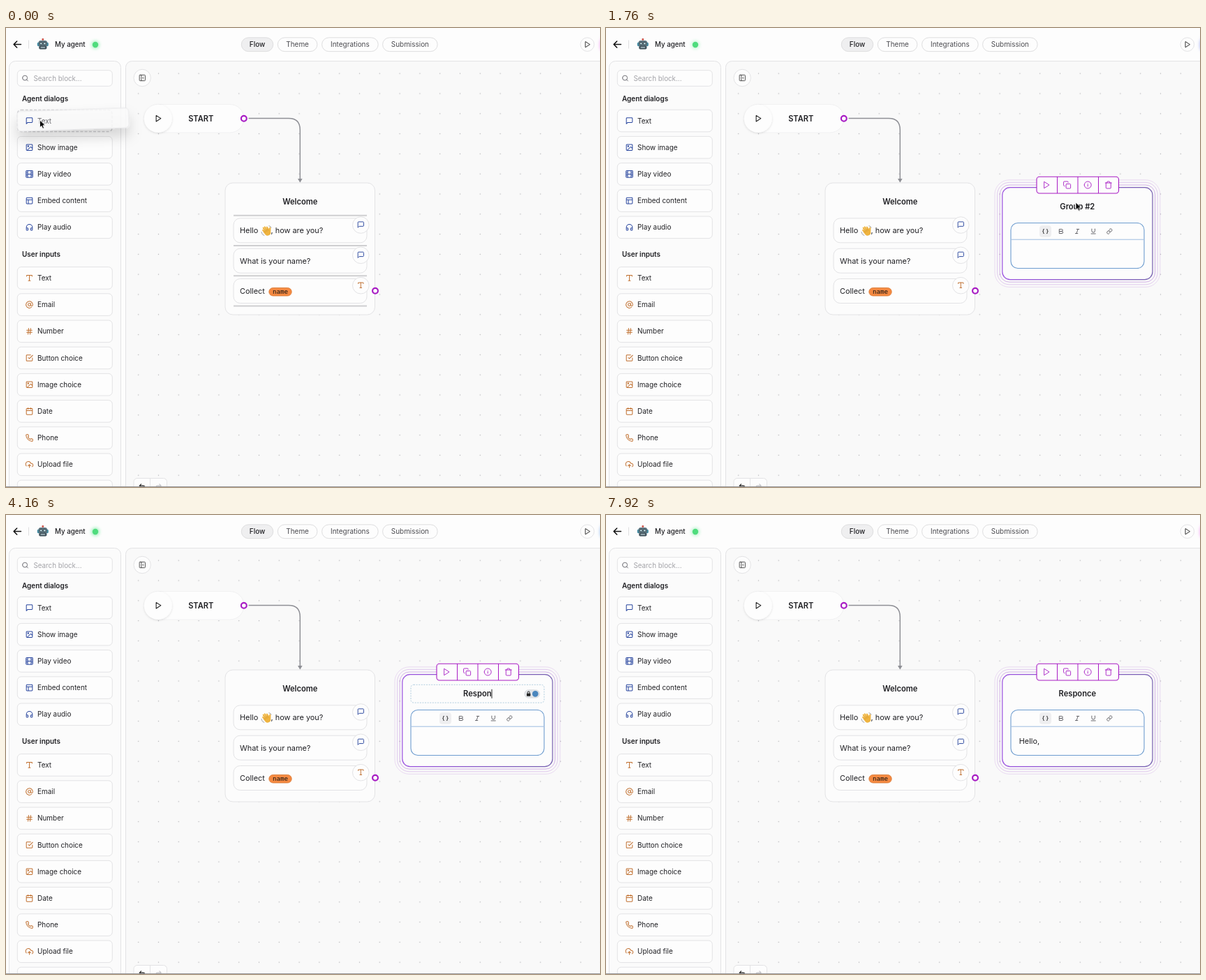
Recreate the animation shown at these times as an HTML page. Size 851 by 658 pixels, loop 8000 ms.

```html
<!DOCTYPE html>
<html lang="en">
<head>
<meta charset="utf-8">
<title>Flow editor</title>
<style>
html, body { margin: 0; width: 100%; height: 100%; overflow: hidden; background: #fdfdfd; }
svg { display: block; font-family: Inter, "Liberation Sans", sans-serif; }
text { white-space: pre; }
</style>
</head>
<body>
<svg id="stage" width="851" height="658" viewBox="0 0 851 658"></svg>
<script>
const BLUE = '#2a479f', ORANGE = '#c07030', PURPLE = '#a81cc4', INK = '#202024', LINE = '#e3e3e5';
const box = (x, y, w, h, r = 2) => `M${x + r} ${y}h${w - 2 * r}a${r} ${r} 0 0 1 ${r} ${r}v${h - 2 * r}a${r} ${r} 0 0 1-${r} ${r}h-${w - 2 * r}a${r} ${r} 0 0 1-${r}-${r}v-${h - 2 * r}a${r} ${r} 0 0 1 ${r}-${r}z`;
const ring = (x, y, r) => `M${x - r} ${y}a${r} ${r} 0 1 0 ${2 * r} 0a${r} ${r} 0 1 0-${2 * r} 0`;

// Line icons on a 24-unit grid
const ICONS = {
  message: 'M21 15a2 2 0 0 1-2 2H7l-4 4V5a2 2 0 0 1 2-2h14a2 2 0 0 1 2 2z',
  image: box(3, 3, 18, 18) + ring(8.5, 8.5, 1.5) + 'M21 15l-5-5L5 21',
  film: box(2, 2, 20, 20) + 'M7 2v20M17 2v20M2 12h20M2 7h5M2 17h5M17 17h5M17 7h5',
  layout: box(3, 3, 18, 18) + 'M3 9h18M9 21V9',
  audio: 'M3 18v-6a9 9 0 0 1 18 0v6M21 19a2 2 0 0 1-2 2h-1a2 2 0 0 1-2-2v-3a2 2 0 0 1 2-2h3zM3 19a2 2 0 0 0 2 2h1a2 2 0 0 0 2-2v-3a2 2 0 0 0-2-2H3z',
  type: 'M4 7V4h16v3M9 20h6M12 4v16',
  at: ring(12, 12, 4) + 'M16 8v5a3 3 0 0 0 6 0v-1a10 10 0 1 0-3.92 7.94',
  hash: 'M4 9h16M4 15h16M10 3L8 21M16 3l-2 18',
  check: 'M9 11l3 3L22 4M21 12v7a2 2 0 0 1-2 2H5a2 2 0 0 1-2-2V5a2 2 0 0 1 2-2h11',
  date: box(3, 4, 18, 18) + 'M16 2v4M8 2v4M3 10h18',
  phone: 'M22 17v3a2 2 0 0 1-2 2A19 19 0 0 1 2 4a2 2 0 0 1 2-2h3a2 2 0 0 1 2 1.7l.8 3.2-2 2.6a16 16 0 0 0 6.7 6.7l2.6-2 3.2.8A2 2 0 0 1 22 17z',
  upload: 'M16 16l-4-4-4 4M12 12v9M20.4 18.4A5 5 0 0 0 18 9h-1.3A8 8 0 1 0 3 16.3',
  play: 'M6 3l14 9-14 9z',
  copy: box(9, 9, 13, 13) + 'M5 15H4a2 2 0 0 1-2-2V4a2 2 0 0 1 2-2h9a2 2 0 0 1 2 2v1',
  info: ring(12, 12, 10) + 'M12 16v-5M12 8h.01',
  trash: 'M3 6h18M19 6v14a2 2 0 0 1-2 2H7a2 2 0 0 1-2-2V6m3 0V4a2 2 0 0 1 2-2h4a2 2 0 0 1 2 2v2',
  bold: 'M6 4h8a4 4 0 0 1 0 8H6zM6 12h9a4 4 0 0 1 0 8H6z',
  italic: 'M19 4h-9M14 20H5M15 4L9 20',
  underline: 'M6 3v7a6 6 0 0 0 12 0V3M4 21h16',
  link: 'M10 13a5 5 0 0 0 7.5.5l3-3a5 5 0 0 0-7-7l-1.8 1.7M14 11a5 5 0 0 0-7.5-.5l-3 3a5 5 0 0 0 7 7l1.8-1.7',
  search: ring(11, 11, 8) + 'M21 21l-4.4-4.4',
  panel: box(3, 3, 18, 18) + 'M9 3v18M16 9l-3 3 3 3',
  back: 'M20 12H4M11 19l-7-7 7-7',
  undo: 'M9 14L4 9l5-5M4 9h11a5 5 0 0 1 0 11h-4',
  redo: 'M15 14l5-5-5-5M20 9H9a5 5 0 0 0 0 11h4'
};

const icon = (name, x, y, color, size = 11.5, width = 2.1) =>
  `<path d="${ICONS[name]}" transform="translate(${x - size / 2} ${y - size / 2}) scale(${size / 24})" fill="none" stroke="${color}" stroke-width="${width}" stroke-linecap="round" stroke-linejoin="round"/>`;
const rect = (x, y, w, h, r, fill = '#fdfdfd', stroke = LINE, extra = '') =>
  `<rect x="${x}" y="${y}" width="${w}" height="${h}" rx="${r}" fill="${fill}" stroke="${stroke}" ${extra}/>`;
const circle = (x, y, r, fill = '#fdfdfd', stroke = LINE, extra = '') =>
  `<circle cx="${x}" cy="${y}" r="${r}" fill="${fill}" stroke="${stroke}" ${extra}/>`;
const line = (d, color, width = 1, extra = '') =>
  `<path d="${d}" fill="none" stroke="${color}" stroke-width="${width}" ${extra}/>`;
const text = (s, x, y, size = 9.95, weight = 400, extra = '', color = INK) =>
  `<text x="${x}" y="${y + size * .36}" font-size="${size}" font-weight="${weight}" fill="${color}" ${extra}>${s}</text>`;
const group = (id, body, extra = '') => `<g id="${id}" ${extra}>${body}</g>`;
const MID = 'text-anchor="middle"';

const button = (label, name, y, color) =>
  rect(16.3, y - 15.8, 136, 31.6, 5.5) + icon(name, 33.5, y, color) + text(label, 45, y);
const pill = (label, x, w, fill = '#fdfdfd', weight = 400, color = '#4b4b50') =>
  rect(x, 13.8, w, 19.8, 9.9, fill, '#dededf') + text(label, x + w / 2, 23.7, 9.95, weight, MID, color);
const port = (x, y) => circle(x, y, 3.9, '#fff', PURPLE, 'stroke-width="2.2"');
const badge = (name, y, color) => circle(508.3, y, 11.8) + icon(name, 508.3, y - .5, color, 11);

function header() {
  const robot = circle(52.8, 16.2, 1.5, '#c9534a', 'none') +
    rect(44.8, 20.6, 16, 5.6, 1.8, '#3f8ba3', 'none') + rect(46.6, 18, 12.4, 8.6, 3, '#5c727d', 'none') +
    rect(47.2, 25.4, 11.2, 5.2, 2, '#43545d', 'none') +
    circle(50.2, 22.3, 1.6, '#d8f6fb', '#22343c', 'stroke-width=".8"') + circle(55.4, 22.3, 1.6, '#d8f6fb', '#22343c', 'stroke-width=".8"') +
    rect(49.6, 27, 6.4, 1.6, .7, '#a9bcc4', 'none');
  return icon('back', 16.3, 23.5, '#111', 15.5, 2.4) + line('M32.5 17.5v12', '#dedee0') + robot +
    text('My agent', 70, 23.7, 9.75, 500) +
    circle(128, 24, 6, '#58e58b', 'none', 'id="halo" filter="url(#soft)"') + circle(128, 24, 4.2, '#4fdc7d', 'none') +
    pill('Flow', 337.3, 45.4, '#efeff0', 500, INK) + pill('Theme', 389.3, 56.6) +
    pill('Integrations', 452.6, 80.6) + pill('Submission', 539.6, 78.6) +
    circle(832.8, 23.6, 9.8) + icon('play', 833, 23.6, '#222', 10.5) +
    '<rect id="glow" x="851" y="14" width="12" height="20" rx="8" filter="url(#soft)"/>';
}

function sidebar() {
  const dialogs = [['Show image', 'image'], ['Play video', 'film'], ['Embed content', 'layout'], ['Play audio', 'audio']];
  const inputs = [['Text', 'type'], ['Email', 'at'], ['Number', 'hash'], ['Button choice', 'check'], ['Image choice', 'image'],
    ['Date', 'date'], ['Phone', 'phone'], ['Upload file', 'upload'], ['', 'type']];
  return rect(4.5, 47.5, 160, 640, 9, '#fbfbfb') + rect(16.3, 60.7, 136, 22.6, 5) +
    icon('search', 27.5, 72, '#66666c', 10.5) + text('Search block...', 39.5, 72.3, 9.8, 400, '', '#a3a3a8') +
    text('Agent dialogs', 23, 101.5, 9.95, 600) +
    group('slot', rect(16.5, 117.5, 135.5, 31, 5, '#f9f9f9', '#cdcdd0', 'stroke-width="1.5" stroke-dasharray="4 2.2"')) +
    group('textButton', button('Text', 'message', 133, BLUE)) +
    dialogs.map(([s, n], i) => button(s, n, 171.2 + 38.2 * i, BLUE)).join('') +
    text('User inputs', 23, 324, 9.95, 600) +
    inputs.map(([s, n], i) => button(s, n, 358.4 + 38.2 * i, ORANGE)).join('');
}

function wave() {
  return `<g transform="translate(373.2 290.8) rotate(-35)" stroke-linecap="round">
    ${line('M-3.6 0v-3.8M-1.3-1v-5M1.1-1v-5M3.5 0v-4', '#efb440', 2.1)}
    ${line('M4 3l2.6-3.6', '#efb440', 2.2)}
    <path d="M-4.6-1h9.1v4.6q-1 3.8-4.5 3.8-4.6-.5-4.6-4.2z" fill="#efb440"/>
    ${line('M-2.4-2v3M0-2.2v3M2.3-2v3', '#c98a2a', .6)}</g>` +
    line('M365.8 292q.6 4.6 4.4 5.6M376.5 283.5q3 .6 3.6 3', '#8f8f94', .8);
}

function canvas() {
  const shade = 'filter="url(#low)"';
  return rect(171.5, 47.5, 700, 640, 9, '#f9f9f9') + '<rect x="172" y="48" width="679" height="609" fill="url(#dots)"/>' +
    circle(195.2, 71.5, 12.2) + icon('panel', 195.3, 71.5, '#444', 11, 2) +
    rect(183, 645.5, 47.5, 24, 5) + line('M206.5 645.5v12', LINE) + icon('undo', 195, 657.5, '#222', 11, 2.4) + icon('redo', 218.5, 657.5, '#c4c4c8', 11, 2.4) +
    rect(198, 109.5, 143, 40.5, 20.2, '#fdfdfd', '#f1f1f2') + circle(217.8, 129.8, 20, '#fdfdfd', 'none', shade) +
    icon('play', 218, 129.7, '#111', 11.5) + text('START', 279.3, 130, 11.1, 600, MID) +
    line('M347.5 129.5H405Q421.3 129.5 421.3 146V217', '#8f9096', 1.5) + '<path d="M418 216h6.6l-3.3 5.8z" fill="#8f9096"/>' + port(340.8, 129.8) +
    rect(314, 222, 214.5, 189, 11, '#fcfcfc') + text('Welcome', 421.3, 248.8, 11.15, 600, MID) +
    [272.8, 316.2, 359.5].map(y => rect(326, y, 191, 35, 9.5)).join('') +
    group('zones', [268.8, 312, 355.2, 398.4].map(y => line(`M326 ${y}h191`, '#cfcfd1', 2)).join('')) +
    badge('message', 282.5, BLUE) + badge('message', 325.8, BLUE) + badge('type', 369.2, ORANGE) +
    text('Hello', 335, 290.5, 10.9) + wave() + text(', how are you?', 379.5, 290.5, 10.9) +
    text('What is your name?', 335, 333.6, 10.9) + text('Collect', 335, 376.8, 10.9) +
    rect(376.8, 372.4, 32.4, 11.6, 5.8, '#f58a42', '#d9752c', 'stroke-width=".8"') +
    text('name', 393, 377.8, 9.1, 400, MID + ' font-family="DejaVu Sans Mono, monospace"', '#111') + port(529, 376.8);
}

function newGroup() {
  const halos = [[3.6, .5], [7.2, .34], [10.8, .22]].map(([d, a]) =>
    rect(567.8 - d, 228.6 - d, 215.2 + 2 * d, 132 + 2 * d, 10 + d, 'none', '#a65fd0', `stroke-opacity="${a}" stroke-width=".9"`)).join('');
  const tools = ['play', 'copy', 'info', 'trash'].map((n, i) => icon(n, 631 + 29.6 * i, 225, PURPLE, 12, 1.8)).join('');
  const marks = ['bold', 'italic', 'underline', 'link'].map((n, i) => icon(n, 652 + 23.1 * i, 291.5, '#55555b', 9.2, 2.3)).join('');
  const field = rect(580, 243.3, 191, 25.8, 4, 'none', '#a9c9dc', 'stroke-width=".9" stroke-dasharray="2 1.6"') +
    rect(743, 250.7, 21.5, 11.4, 5.7, '#e2e5e9', '#c9cdd2', 'stroke-width=".6"') +
    rect(746, 255.7, 5.4, 4, .8, '#222', 'none') + line('M747.2 256v-1.5q0-1.5 1.5-1.5t1.5 1.5v1.5', '#222', 1) +
    circle(758.3, 256.4, 4.3, '#4a86bd', 'none');
  return halos + rect(567.8, 228.6, 215.2, 132, 11, '#fcfcfc', 'url(#edge)', 'stroke-width="1.2"') +
    rect(617, 213.2, 117.5, 23.8, 4, '#fdfdfd', PURPLE, 'stroke-width="1.1"') + line('M646.5 213v24M676 213v24M705.5 213v24', PURPLE) + tools +
    group('field', field) + group('picked', rect(650, 249.3, 51, 14, 0, '#abc9ec', 'none')) +
    text('', 675.3, 255.8, 11.15, 600, `id="title" ${MID}`) +
    rect(580, 279.5, 191, 65, 10, '#fdfdfd', '#6d9ccf', 'stroke-width="1.1"') + line('M580.5 303.2h190', '#9dbce0') +
    rect(621, 283.3, 17, 16.4, 4, '#eeeef0', 'none') + text('{ }', 629.5, 291.3, 8, 600, MID, '#333') + marks +
    text('', 591.7, 324, 10.9, 400, 'id="body"') + '<rect id="caret" width="1" height="13" fill="#222"/>';
}

const dragCard = `<g transform="rotate(-1.9 96 131.5)">${rect(16, 117, 160, 28.5, 5, '#fbfbfb', '#e6e6e8', 'fill-opacity=".86" filter="url(#lift)"')}</g>` +
  icon('message', 33.5, 133, BLUE) + text('Text', 45, 133, 9.95, 400, '', '#66666b');
const arrow = '<path d="M0 0V10.6L2.5 8.4 4.2 12.2 6 11.4 4.4 7.7H7.7Z" fill="#000" stroke="#fff" stroke-width=".8"/>';
const hand = '<path d="M0 0q1.2 0 1.2 1.2v3q1.2-.6 2 .4 1.3-.5 1.9.5 1.9-.3 1.9 1.5 0 2.4-1.3 5v1.3H-.8V11.5L-4 7.4q-.6-1.4 1-1.3l1.8 1.4V1.2Q-1.2 0 0 0zM1.2 7.8v2.6M3.2 7.8v2.6" fill="#fff" stroke="#111" stroke-width=".9" stroke-linejoin="round"/>';

const stage = document.getElementById('stage');
stage.innerHTML = `<defs>
  <pattern id="dots" x="175.3" y="50.8" width="28.8" height="28.8" patternUnits="userSpaceOnUse"><circle cx="14.4" cy="14.4" r=".75" fill="#b5b5b9"/></pattern>
  <linearGradient id="edge"><stop stop-color="#9a4fe0"/><stop offset="1" stop-color="#7660b0"/></linearGradient>
  <filter id="soft" x="-1" y="-1" width="3" height="3"><feGaussianBlur stdDeviation="2.2"/></filter>
  <filter id="low" x="-.5" y="-.5" width="2" height="2"><feDropShadow dx="0" dy="1" stdDeviation="1.6" flood-opacity=".13"/></filter>
  <filter id="lift" x="-.3" y="-1" width="1.6" height="4"><feDropShadow dx="0" dy="12" stdDeviation="9" flood-opacity=".17"/></filter>
</defs><rect width="851" height="658" fill="#fdfdfd"/>` +
  header() + canvas() + sidebar() + group('newGroup', newGroup()) + group('drag', dragCard) +
  group('arrow', arrow) + group('hand', hand) + line('M0 657.5H851', '#9a9a9d');

const $ = id => document.getElementById(id);
const show = (id, on) => $(id).setAttribute('display', on ? 'inline' : 'none');
const move = (id, x, y) => $(id).setAttribute('transform', `translate(${x} ${y})`);
const ease = (t, a, b) => { const u = Math.min(1, Math.max(0, (t - a) / (b - a))); return u * u * (3 - 2 * u); };

const LOOP = 8000, DROP = 1520, PICK = 2080, BLUR = 5680;
const TITLE = 'Responce', TITLE_KEYS = [2880, 3080, 3280, 3560, 3800, 4040, 4300, 4600];
const BODY = 'Hello,', BODY_KEYS = [6240, 6440, 6640, 6840, 7080, 7360];

function draw(t) {
  const dragging = t < DROP, editing = t >= PICK && t < BLUR;
  const typed = TITLE_KEYS.filter(k => k <= t), written = BODY_KEYS.filter(k => k <= t);

  for (const id of ['slot', 'zones', 'drag']) show(id, dragging);
  show('textButton', !dragging);
  show('newGroup', !dragging);
  show('field', editing);
  show('picked', editing && !typed.length);

  const p = ease(t, 0, 1000), q = ease(t, DROP, 1960);
  const x = 48.5 + 629 * p, y = 132 + 104.5 * p;
  move('drag', 628.5 * p, 104.8 * p);
  move('hand', x, y);
  move('arrow', x - 7.8 * q, y + 23.5 * q);
  show('hand', dragging && t >= 120);
  show('arrow', t < 120 || !dragging && !typed.length);

  $('title').textContent = typed.length ? TITLE.slice(0, typed.length) : 'Group #2';
  $('title').setAttribute('y', (editing ? 256.3 : 255.6) + 4);
  $('body').textContent = BODY.slice(0, written.length);

  const inTitle = editing && typed.length, inBody = t >= BLUR;
  const since = t - (inBody ? written.at(-1) ?? BLUR : typed.at(-1) ?? 0);
  show('caret', (inTitle || inBody) && since % 1000 < 500);
  if (inTitle || inBody) {
    const width = $(inBody ? 'body' : 'title').getComputedTextLength();
    $('caret').setAttribute('x', inBody ? 591.7 + width : 675.3 + width / 2);
    $('caret').setAttribute('y', inBody ? 317.5 : 249.8);
  }

  const hue = 255 + 45 * Math.cos(2 * Math.PI * t / 2640);
  $('glow').setAttribute('fill', `hsl(${hue} 80% 80%)`);
  $('halo').setAttribute('opacity', .45 + .2 * Math.sin(2 * Math.PI * t / 2000));
}

const start = performance.now();
function tick() {
  draw((performance.now() - start) % LOOP);
  requestAnimationFrame(tick);
}
tick();
</script>
</body>
</html>
```
